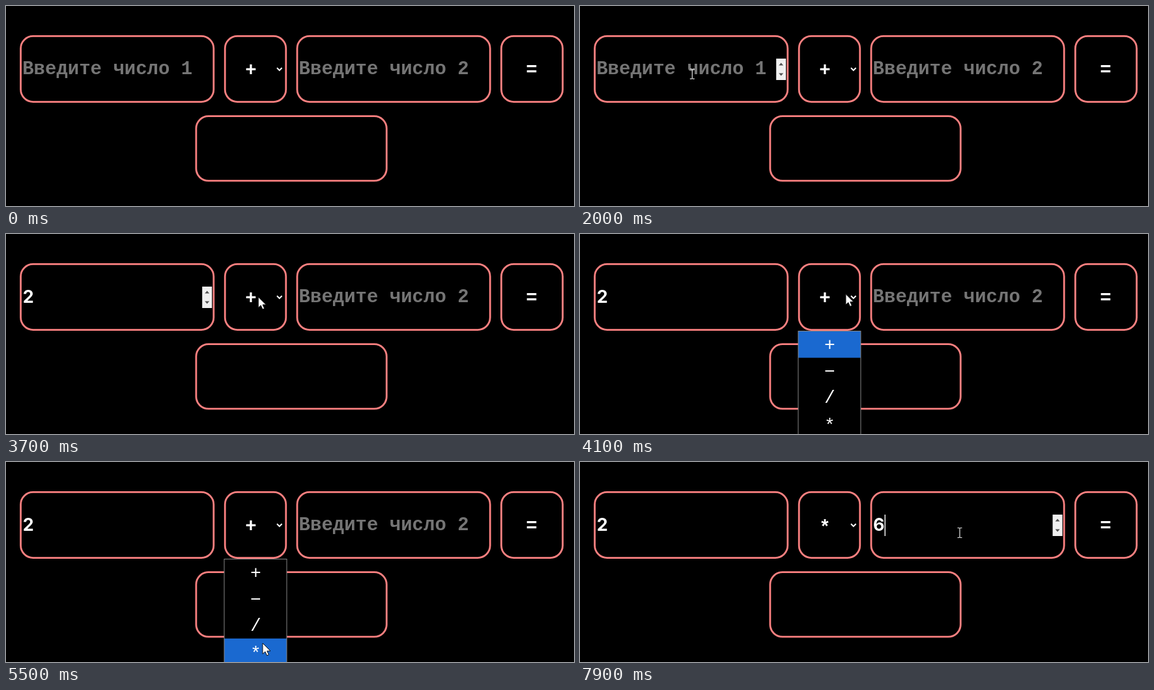
An HTML page that plays this animation: 872 px wide and 308 px high, repeating every 8000 ms.

```html
<!DOCTYPE html>
<html lang="ru">
<head>
<meta charset="utf-8">
<title>Калькулятор</title>
<style>
html, body { margin: 0; width: 100%; height: 100%; overflow: hidden; background: #000; }
svg { display: block; width: 100vw; height: 100vh; }
text { fill: #fff; font: 700 29px "Liberation Mono", monospace; white-space: pre; }
.hint { fill: #757575; }
.num { font: 700 27px Inter, sans-serif; }
.opt { font-weight: 400; font-size: 28px; }
.mid { text-anchor: middle; }
.box { fill: none; stroke: #fa8080; stroke-width: 2.8; }
</style>
</head>
<body>
<svg id="stage" viewBox="0 0 872 308"></svg>
<script>
const LOOP = 8000, STEP = 100;
const stage = document.getElementById('stage');

function add(tag, attrs, parent = stage, text = '') {
  const el = document.createElementNS('http://www.w3.org/2000/svg', tag);
  for (const k in attrs) el.setAttribute(k, attrs[k]);
  el.textContent = text;
  parent.appendChild(el);
  return el;
}
const group = () => add('g', {});
const label = (cls, x, y, s, parent) => add('text', { class: cls, x, y }, parent, s);
const box = (x, y, width, height) => add('rect', { class: 'box', x, y, width, height, rx: 19 });
const show = (el, on) => el.setAttribute('display', on ? 'inline' : 'none');
const place = (el, x, y) => el.setAttribute('transform', `translate(${x.toFixed(1)} ${y.toFixed(1)})`);

function field(x, hint, digit) {
  box(x + 1.4, 46.4, 296.2, 101.2);
  const spin = group();
  add('rect', { x: x + 280, y: 81, width: 15, height: 33, fill: '#f0f0f0' }, spin);
  add('path', { d: `M${x + 284} 91.5h7l-3.5 -4zM${x + 284} 103.5h7l-3.5 4z`, fill: '#505050' }, spin);
  return {
    x, spin,
    hint: label('hint', x + 4, 105, hint),
    value: label('num', x + 4.5, 106, digit),
    caret: add('rect', { y: 81, width: 1.4, height: 33, fill: '#fff' })
  };
}

const first = field(21.2, 'Введите число 1', '2');
const second = field(445.6, 'Введите число 2', '6');
box(336.2, 46.4, 93.6, 101.2);
box(760.4, 46.4, 94.2, 101.2);
box(291.9, 169.6, 292.4, 99.6);
label('mid', 807, 106.5, '=');

const ring = group();
add('rect', { x: 335.7, y: 45.8, width: 94.6, height: 102.6, rx: 19, fill: 'none', stroke: '#000', 'stroke-width': 2.2 }, ring);
add('rect', { x: 334.4, y: 44.6, width: 97.2, height: 105, rx: 20, fill: 'none', stroke: '#fff', 'stroke-width': 1.4 }, ring);
const plus = label('mid', 376, 106.5, '+');
const star = label('mid', 376, 110, '*');
add('path', { d: 'M416 95.3l3.8 3.8 3.8 -3.8', fill: 'none', stroke: '#fff', 'stroke-width': 2 });

const ROW = 40.6, LIST_TOP = 150;
const list = group();
add('rect', { x: 335, y: 149.5, width: 96, height: 170, fill: '#000' }, list);
const mark = add('rect', { x: 335, width: 96, height: ROW, fill: '#1a69d0' }, list);
add('rect', { x: 335, y: 149.5, width: 96, height: 170, fill: 'none', stroke: '#858585' }, list);
['+', '−', '/', '*'].forEach((s, i) =>
  label('opt mid', 383.5, 179 + i * 40.5 + (i === 3 ? 2 : 0), s, list));

const arrow = add('path', {
  d: 'M0 0V16.5L3.9 13 6.6 19 9.4 17.8 6.8 12H12Z', fill: '#fff', stroke: '#111', 'stroke-width': 1
});
const beam = add('path', {
  d: 'M-3.5 -7.5H-1.2L0 -6.8 1.2 -7.5H3.5M0 -6.8V6.8M-3.5 7.5H-1.2L0 6.8 1.2 7.5H3.5',
  fill: 'none', stroke: '#e6e6e6', 'stroke-width': 1.2
});

// Pointer path: time, x, y
const path = [
  [600, 186, 274], [900, 168, 129], [1400, 174, 108], [2200, 172, 104], [2600, 172, 104],
  [2800, 166, 108], [3200, 166, 108], [3800, 405, 96], [4000, 408, 92.5], [4400, 408, 92.5],
  [5300, 395, 264], [5500, 394, 279], [5700, 394, 279], [6300, 587, 87],
  [6700, 587, 87], [7100, 583, 109], [8000, 583, 109]
];

function pointer(t) {
  let i = 0;
  while (i < path.length - 2 && t >= path[i + 1][0]) i++;
  const [t0, x0, y0] = path[i], [t1, x1, y1] = path[i + 1];
  const u = Math.min(1, Math.max(0, (t - t0) / (t1 - t0)));
  const e = t0 === 600 ? u : u * u * (3 - 2 * u);
  return [x0 + (x1 - x0) * e, y0 + (y1 - y0) * e];
}

const within = (t, a, b) => t >= a && t < b;

function drawField(f, t, focus, blur, typed, hover) {
  const full = t >= typed, focused = within(t, focus, blur);
  show(f.hint, !full);
  show(f.value, full);
  show(f.spin, focused || hover);
  const blink = Math.floor((t - (full ? typed : focus)) / 500) % 2 === 0;
  show(f.caret, focused && blink);
  f.caret.setAttribute('x', f.x + (full ? 22 : 5));
}

function render(t) {
  const [x, y] = pointer(t);
  const open = within(t, 4000, 5700);
  const over = f => t > 900 && !open && within(x, f.x, f.x + 299) && within(y, 45, 149);

  drawField(first, t, 1400, 4000, 3000, over(first));
  drawField(second, t, 6500, LOOP, 7800, over(second));
  show(ring, within(t, 5700, 6500));
  show(plus, t < 5700);
  show(star, t >= 5700);

  show(list, open);
  const row = Math.min(3, Math.max(0, Math.floor((y - LIST_TOP) / ROW)));
  mark.setAttribute('y', LIST_TOP + row * ROW);

  const text = over(first) || over(second) || t === 900;
  show(beam, t >= 600 && text);
  show(arrow, t >= 600 && !text);
  place(beam, x, y);
  place(arrow, x, y);
}

const start = performance.now();
function tick() {
  const t = (performance.now() - start) % LOOP;
  render(Math.floor(t / STEP) * STEP);
  requestAnimationFrame(tick);
}
tick();
</script>
</body>
</html>
```
